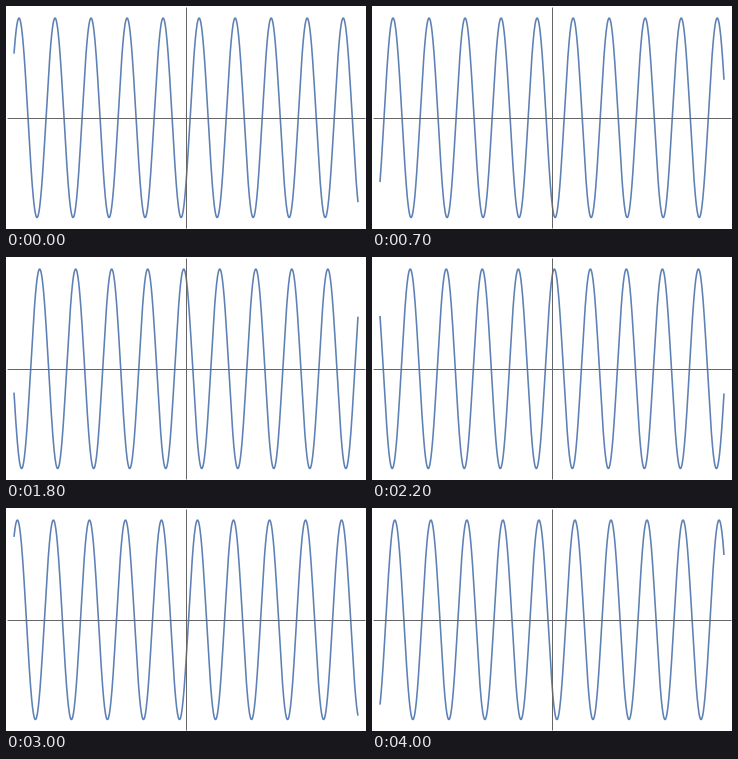
A matplotlib script that plays this animation: 360x223 px, repeating every 4.1 s.

```python
import numpy as np
import matplotlib.pyplot as plt
from matplotlib.animation import FuncAnimation

WIDTH, HEIGHT, DPI = 360, 223, 100
FRAMES, INTERVAL = 41, 100
CENTER_X, CENTER_Y = 180, 111.8
UNIT, AMPLITUDE = 344 / 60, 99.7
START, STEP = 7.0, 0.2  # phase in radians


def px(width):
    """Convert pixels to points."""
    return width * 72 / DPI


fig = plt.figure(figsize=(WIDTH / DPI, HEIGHT / DPI), dpi=DPI, facecolor="white")
ax = fig.add_axes([0, 0, 1, 1])
ax.set_xlim(0, WIDTH)
ax.set_ylim(HEIGHT, 0)
ax.axis("off")

x = np.linspace(-30, 30, 1500)
(wave,) = ax.plot([], [], color="#5e81b5", lw=px(1.6),
                  solid_capstyle="butt", solid_joinstyle="round", zorder=1)

axis_style = dict(color="#666666", lw=px(1), solid_capstyle="butt", zorder=2)
ax.plot([1, 359], [111.5, 111.5], **axis_style)
ax.plot([179.5, 179.5], [1, 222], **axis_style)


def update(frame):
    y = np.sin(x - START - STEP * frame)
    wave.set_data(CENTER_X + UNIT * x, CENTER_Y - AMPLITUDE * y)
    return (wave,)


anim = FuncAnimation(fig, update, frames=FRAMES, interval=INTERVAL,
                     repeat=True, repeat_delay=0, blit=False)
plt.show()
```
